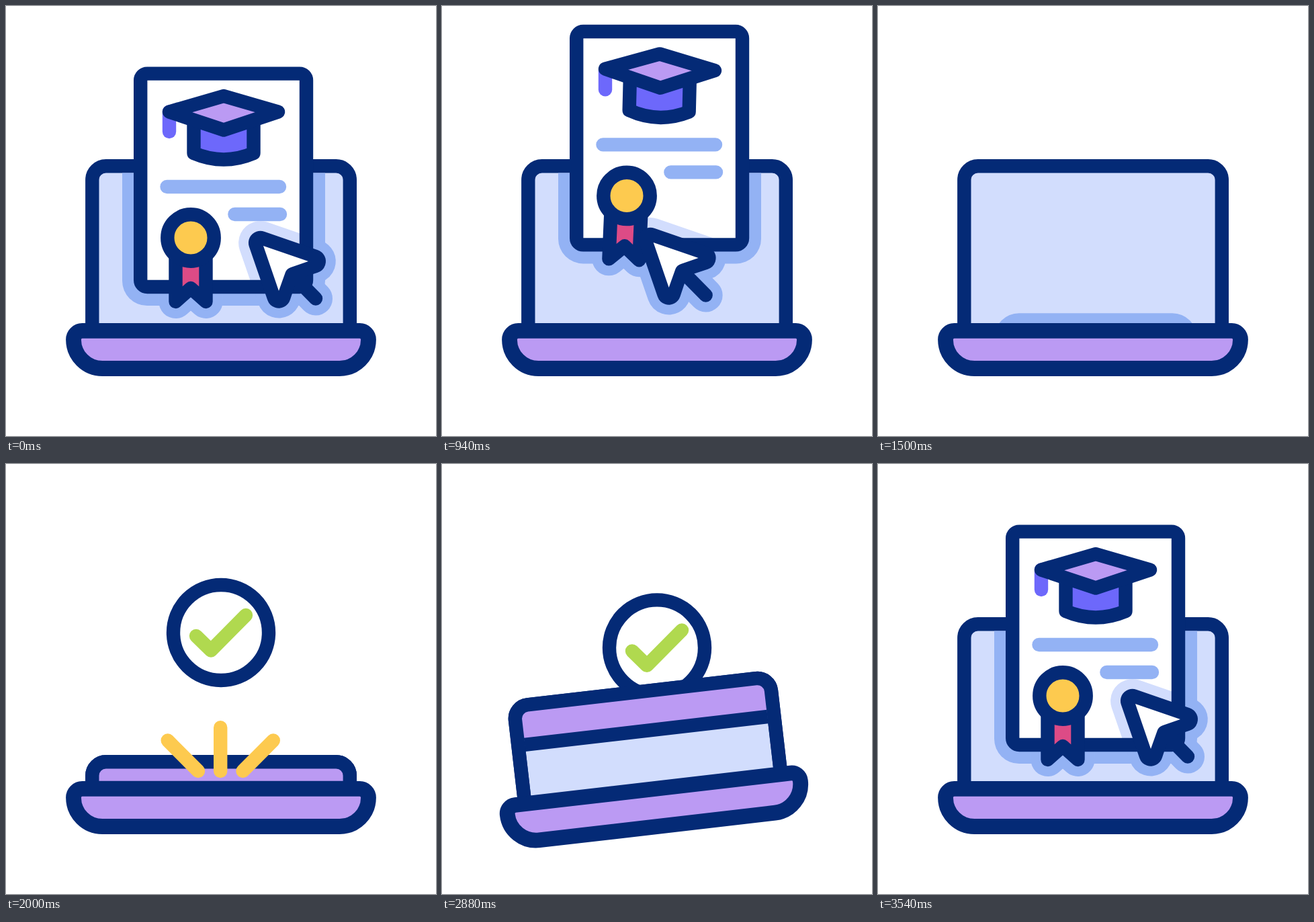
An HTML page that plays this animation: 640x640 px, repeating every 3600 ms.

```html
<!DOCTYPE html>
<html lang="en">
<head>
<meta charset="utf-8">
<title>Online certificate</title>
<style>
html, body { margin: 0; width: 100%; height: 100%; overflow: hidden; background: #fff; }
svg { display: block; width: 100vw; height: 100vh; }
.ink { stroke: #042a76; stroke-width: 20.4; }
.soft { stroke: #93b2f4; fill: #93b2f4; }
.pale { stroke: #d2ddfd; fill: #d2ddfd; }
.bar { stroke: #93b2f4; stroke-width: 20.4; }
</style>
</head>
<body>
<svg viewBox="0 0 640 640" fill="none" stroke-linecap="round" stroke-linejoin="round">
  <defs>
    <clipPath id="screen"><rect x="138.5" y="248.5" width="363.2" height="232" rx="10"/></clipPath>
    <clipPath id="above"><rect y="-50" width="640" height="532"/></clipPath>
    <clipPath id="page"><rect x="205" y="105" width="237" height="308"/></clipPath>
    <path id="ribbon" d="M252.5 375V440L275 420L297.5 440V375"/>
    <path id="arrow" d="M378.6 352.6L458.3 380L419 393L406 432Z"/>
    <path id="tail" d="M424 398L461 435.5"/>
    <g id="halo">
      <use href="#arrow" stroke-width="65"/>
      <use href="#tail" stroke-width="50"/>
    </g>
  </defs>

  <g id="badgeCheck">
    <circle class="ink" cx="320" cy="251" r="71" fill="#fff"/>
    <path d="M283 256L305 277.5L357 225" stroke="#b0d94f" stroke-width="20.4"/>
  </g>

  <g id="laptop">
    <path id="lid" class="ink" fill="#d2ddfd"/>
    <g id="back">
      <path id="backFill" fill="#bb9af3"/>
      <path id="edge" class="ink" stroke-linecap="butt"/>
      <path id="frame" class="ink"/>
    </g>

    <g id="content">
      <g clip-path="url(#screen)" class="soft">
        <g class="doc">
          <rect x="173" y="73" width="302" height="373" rx="37" stroke="none"/>
          <use href="#ribbon" class="swing" stroke-width="50"/>
        </g>
        <use href="#halo" class="cursor"/>
      </g>
      <g clip-path="url(#above)">
        <g class="doc">
          <rect x="200.2" y="100.6" width="246.8" height="317.4" rx="10" fill="#fff"/>
          <path class="bar" d="M239.5 269H407M340.4 310H408"/>
          <g clip-path="url(#page)"><g class="undo"><use href="#halo" class="cursor pale"/></g></g>
          <rect class="ink" x="200.2" y="100.6" width="246.8" height="317.4" rx="10"/>
          <path id="capBody" class="ink" fill="#6d68fb" d="M279.5 172V219Q324 238 368.5 219V172"/>
          <path id="tassel" stroke="#6d68fb" stroke-width="20.4"/>
          <path id="board" class="ink" fill="#bb9af3"/>
          <use href="#ribbon" class="ink swing" fill="#dd4b86"/>
          <circle class="ink" cx="275" cy="345" r="34.7" fill="#fdca4f"/>
        </g>
        <g class="cursor">
          <use href="#arrow" stroke="#042a76" fill="#042a76" stroke-width="35.4"/>
          <use href="#tail" class="ink"/>
          <path fill="#fff" d="M383 357L450 380L424 389Q418 391 416 396L406 424Z"/>
        </g>
      </g>
    </g>

    <path stroke="#042a76" stroke-width="22.8" fill="#bb9af3"
      d="M113.5 483.4H526.5A13 13 0 0 1 539.5 496.4A43 43 0 0 1 496.5 539.5H143.5A43 43 0 0 1 100.5 496.4A13 13 0 0 1 113.5 483.4Z"/>
  </g>

  <path id="rays" stroke="#fdca4f" stroke-width="20.4"/>
</svg>
<script>
const LOOP = 3600;
const el = id => document.getElementById(id);
const set = (node, name, value) => node.setAttribute(name, value);
const setAll = (sel, name, value) =>
  document.querySelectorAll(sel).forEach(n => set(n, name, value));
const show = (id, on) => set(el(id), 'display', on ? 'inline' : 'none');
const lerp = (a, b, u) => a + (b - a) * u;

// Values joined by cosine easing: time, value, time, value, ...
function track(t, ...k) {
  if (t <= k[0]) return k[1];
  for (let i = 2; i < k.length; i += 2) {
    if (t < k[i]) {
      const u = (t - k[i - 2]) / (k[i] - k[i - 2]);
      return lerp(k[i - 1], k[i + 1], (1 - Math.cos(Math.PI * u)) / 2);
    }
  }
  return k[k.length - 1];
}

function drawLid(t) {
  const top = track(t, 1600, 238.3, 1840, 443.3, 2757, 443.3, 3000, 238.3);
  const low = Math.max(top, track(t, 1580, 238.3, 1800, 482, 2800, 482, 3000, 238.3));
  const panel = (bottom, r) =>
    `M128.3 ${bottom}V${top + r}a${r} ${r} 0 0 1 ${r} ${-r}H${511.8 - r}a${r} ${r} 0 0 1 ${r} ${r}V${bottom}`;
  const frame = panel(486, 20.5);
  set(el('lid'), 'd', frame);
  set(el('frame'), 'd', frame);
  set(el('backFill'), 'd', panel(low, Math.min(20.5, low - top)) + 'Z');
  set(el('edge'), 'd', `M138 ${low}H502`);
  show('back', low - top > 0.5);
}

function drawCap(s, k) {
  set(el('capBody'), 'transform', `rotate(${-6 * s} 324 185)`);
  set(el('board'), 'd',
    `M243 ${157.5 + 5 * s}L324 134L${405 - 4 * s} ${157.5 - 5 * s}L${324 - 4 * s} 184.5Z`);
  const x = lerp(243, 321, k), y = lerp(157.5, 185, k);
  set(el('tassel'), 'd', `M${x} ${y}V${y + lerp(29.5, 34, k)}`);
}

function drawRays(t) {
  const tip = track(t, 1840, 0, 1980, 1);
  const root = track(t, 2200, 0, 2360, 1);
  const ray = (x, dx, dy) =>
    `M${x + dx * root} ${457 + dy * root}L${x + dx * tip} ${457 + dy * tip}`;
  set(el('rays'), 'd', ray(286, -45.3, -45.5) + ray(319.2, 0, -64.7) + ray(352.5, 45.3, -45.5));
  show('rays', tip > 0 && root < 1);
}

function draw(t) {
  const tilt = track(t, 2000, 0, 2200, 10.2, 2400, -10.2, 2600, 10.2, 2800, -10.2, 3000, 0);
  set(el('laptop'), 'transform', `rotate(${tilt} 320 537)`);
  drawLid(t);

  const docY = track(t, 720, 0, 990, -68, 1600, 415, 2920, 415, 3310, -68, 3520, 0);
  const swing = track(t, 720, 0, 850, -.5, 1180, 1, 1500, 0,
    2920, 0, 3100, -1, 3310, .4, 3420, -.3, 3520, 0);
  setAll('.doc', 'transform', `translate(0 ${docY})`);
  setAll('.undo', 'transform', `translate(0 ${-docY})`);
  setAll('.swing', 'transform', `rotate(${-10.5 * swing} 275 345)`);
  drawCap(swing, track(t, 960, 0, 1170, 1, 3250, 1, 3480, 0));

  const x = track(t, 0, 0, 520, -92, 700, -92, 1412, 0);
  const y = track(t, 0, 0, 520, -5, 950, -5, 1354, 205, 3080, 205, 3500, 0);
  const press = track(t, 500, 1, 600, .905, 700, 1);
  setAll('.cursor', 'transform',
    `translate(${360 + x} ${334 + y}) scale(${press}) translate(-360 -334)`);
  show('content', t < 1600 || t > 2920);

  const drop = track(t, 1640, 189, 1980, 0, 2800, 0, 3162, 189);
  set(el('badgeCheck'), 'transform', `translate(0 ${drop})`);
  show('badgeCheck', t > 1640 && t < 3162);
  drawRays(t);
}

function tick(now) {
  draw(now % LOOP);
  requestAnimationFrame(tick);
}
draw(0);
requestAnimationFrame(tick);
</script>
</body>
</html>
```
